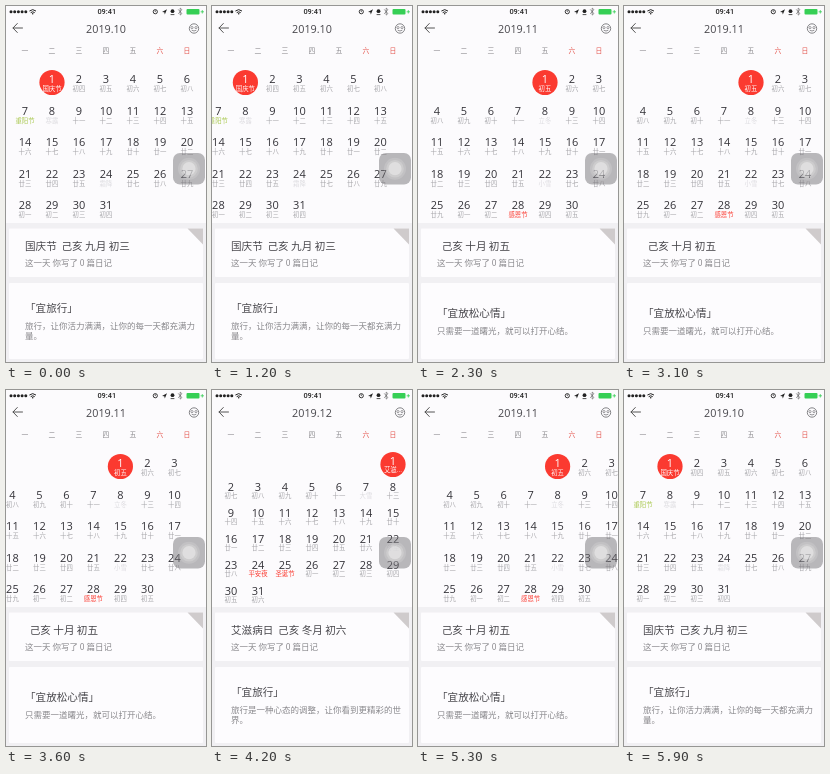
These frames come from a looping animation (200 by 356 pixels, 6000 ms). An HTML page:

```html
<!DOCTYPE html>
<html lang="zh-CN">
<head>
<meta charset="utf-8">
<title>日历</title>
<style>
html, body { margin: 0; width: 100%; height: 100%; overflow: hidden; background: #fcfbfd; }
svg { display: block; width: 100vw; height: 100vh; }
text { font-family: "Noto Sans CJK SC", "Noto Sans CJK", sans-serif; font-weight: 300; white-space: pre; }
.num { font-family: "Open Sans", "Noto Sans", sans-serif; font-weight: 400; }
.bar { font-family: Roboto, Inter, sans-serif; font-weight: 500; }
</style>
</head>
<body>
<script>
const LOOP = 6000, PAGE = 200, RED = '#fb3a30';
const INK = '#333238', SOFT = '#a5a4a8', FAINT = '#dddce0';

function el(parent, tag, attrs, text) {
  const node = document.createElementNS('http://www.w3.org/2000/svg', tag);
  for (const k in attrs) node.setAttribute(k, attrs[k]);
  if (text !== undefined) node.textContent = text;
  parent.append(node);
  return node;
}

// Text placed by its vertical centre
const baseline = (cy, size) => cy + size * 0.365;
function label(parent, str, x, cy, size, fill, anchor = 'middle', cls = '') {
  return el(parent, 'text', {
    x, y: baseline(cy, size), 'font-size': size, fill, 'text-anchor': anchor, class: cls
  }, str);
}

const svg = el(document.body, 'svg', { viewBox: '0 0 200 356', preserveAspectRatio: 'none' });
const rect = (p, x, y, width, height, fill, rx = 0) => el(p, 'rect', { x, y, width, height, fill, rx });
const line = (p, d, stroke, width = 1) =>
  el(p, 'path', { d, stroke, 'stroke-width': width, fill: 'none', 'stroke-linecap': 'round', 'stroke-linejoin': 'round' });
const dot = (p, cx, cy, r, fill, extra = {}) => el(p, 'circle', { cx, cy, r, fill, ...extra });

// first: weekday column of day 1; lunar: lunar day of day 1; fresh: day a lunar month begins
const months = [
  {
    title: '2019.10', days: 31, first: 1, lunar: 3, fresh: 28, top: 73, pitch: 31.5,
    marks: { 1: ['国庆节', RED], 7: ['重阳节', '#a9c84e'], 8: ['寒露', FAINT], 24: ['霜降', FAINT] },
    date: '国庆节  己亥 九月 初三', advice: '「宜旅行」',
    lines: ['旅行，让你活力满满，让你的每一天都充满力', '量。']
  },
  {
    title: '2019.11', days: 30, first: 4, lunar: 5, fresh: 26, top: 73, pitch: 31.5,
    marks: { 8: ['立冬', FAINT], 22: ['小雪', FAINT], 28: ['感恩节', RED] },
    date: '  己亥 十月 初五', advice: '「宜放松心情」',
    lines: ['只需要一道曙光，就可以打开心结。']
  },
  {
    title: '2019.12', days: 31, first: 6, lunar: 6, fresh: 26, top: 71, pitch: 26,
    marks: { 1: ['艾滋...', RED], 7: ['大雪', FAINT], 22: ['冬至', FAINT], 24: ['平安夜', RED], 25: ['圣诞节', RED] },
    date: '艾滋病日  己亥 冬月 初六', advice: '「宜旅行」',
    lines: ['旅行是一种心态的调整，让你看到更精彩的世', '界。']
  }
];

function lunarName(n) {
  const digit = '一二三四五六七八九十';
  return (n <= 10 ? '初' : n < 20 ? '十' : '廿') + digit[(n - 1) % 10];
}

// Sliding month pages
const strip = el(svg, 'g', {});
months.forEach((m, page) => {
  const g = el(strip, 'g', { transform: `translate(${page * PAGE} 0)` });
  const gap = m.pitch > 30 ? 10 : 9;
  for (let d = 1; d <= m.days; d++) {
    const cell = m.first + d - 1;
    const x = 19 + cell % 7 * 27;
    const y = m.top + Math.floor(cell / 7) * m.pitch;
    const n = d < m.fresh ? d + m.lunar - 1 : d - m.fresh + 1;
    const [name, color] = m.marks[d] || [lunarName(n), SOFT];
    const disc = d === 1 && dot(g, x, y + 3.5, 12.6, RED);
    const num = label(g, d, x, y, 11, INK, 'middle', 'num');
    const sub = label(g, name, x, y + gap, 6.4, color);
    if (disc) m.select = on => {
      disc.setAttribute('visibility', on ? 'visible' : 'hidden');
      num.setAttribute('fill', on ? '#fff' : INK);
      sub.setAttribute('fill', on ? '#fff' : color);
    };
  }
});

// Status bar
for (let i = 0; i < 5; i++) dot(svg, 5 + i * 3.7, 5.7, 1.5, '#222');
line(svg, 'M23.7 4.8Q26.7 2.2 29.7 4.8M25 6.4Q26.7 5 28.4 6.4', '#222', 1);
dot(svg, 26.7, 7.8, 0.8, '#222');
label(svg, '09:41', 100.8, 5.7, 7.4, '#222', 'middle', 'bar');
dot(svg, 149.3, 5.7, 2.1, 'none', { stroke: '#222', 'stroke-width': 0.9 });
line(svg, 'M149.3 5.7v-1', '#222', 0.7);
el(svg, 'path', { d: 'M156 6L161 3.2L158.8 8.4L158.3 6.3Z', fill: '#222' });
dot(svg, 166.5, 5.2, 1.9, '#222');
line(svg, 'M165 8.6h3', '#222', 0.8);
line(svg, 'M172.5 3.7l3.4 3.9l-1.7 1.5v-7l1.7 1.5l-3.4 4', '#555', 0.6);
rect(svg, 180.5, 3.1, 13, 5.4, '#36cf55', 1);
line(svg, 'M195 5.8h2.6M196.3 4.5v2.6', '#36cf55', 0.8);

// Header
line(svg, 'M16.5 22H7M11.3 17.5L7 22L11.3 26.5', '#555', 1);
const title = label(svg, '', 100, 23, 10.8, '#48474c', 'middle', 'num');
dot(svg, 188, 22.5, 4.7, 'none', { stroke: '#77767a', 'stroke-width': 0.9 });
for (const x of [186, 190]) dot(svg, x, 21.6, 1.1, 'none', { stroke: '#77767a', 'stroke-width': 0.7 });
line(svg, 'M186 24.4Q188 25.8 190 24.4', '#77767a', 0.8);
[...'一二三四五六日'].forEach((c, i) =>
  label(svg, c, 19 + i * 27, 45, 6.8, i > 4 ? '#e4564f' : '#88878b'));

// Cards
rect(svg, 0, 217, 200, 139, '#f1f0f3');
rect(svg, 3, 222.5, 194, 48.5, '#fdfcfe', 1);
rect(svg, 3, 277, 194, 76, '#fdfcfe', 1);
el(svg, 'path', { d: 'M181.5 222.5H197V238.5Z', fill: '#cfcbcc' });
const HEAD = 10.6, COPY = 8.5;
const cardText = (str, cy, size, fill) => label(svg, str, 19, cy, size, fill, 'start');
const dateText = cardText('', 240, HEAD, '#48474c');
cardText('这一天 你写了 0 篇日记', 257, COPY, '#89888c');
const advice = cardText('', 302, HEAD, '#48474c');
const body = [0, 1].map(() => cardText('', 320, COPY, '#89888c'));

// Floating button
rect(svg, 167, 147, 32, 31.5, 'rgba(110,108,113,.48)', 7);
[[11, 0.14], [8.8, 0.18], [6.6, 0.36]].forEach(([r, a]) => dot(svg, 183, 162.7, r, `rgba(255,255,255,${a})`));

let shown = -1;
function show(i) {
  if (i === shown) return;
  shown = i;
  const m = months[i], drop = m.lines.length === 1 ? 4.8 : 0;
  months.forEach((o, k) => o.select(k === i));
  title.textContent = m.title;
  dateText.textContent = m.date;
  advice.textContent = m.advice;
  advice.setAttribute('y', baseline(302 + drop, HEAD));
  body.forEach((t, k) => {
    t.textContent = m.lines[k] || '';
    t.setAttribute('y', baseline(320 + drop + k * 9.5, COPY));
  });
}

// Swipes: start time, from page, to page; details refresh after landing
const swipes = [[1100, 0, 1], [3500, 1, 2], [4400, 2, 1], [5200, 1, 0]];
const curve = [0, 0.06, 0.36, 0.72, 0.94, 1];
const STEP = 100, LAND = 500, REFRESH = 600;

function progress(ms) {
  const p = Math.min(Math.max(ms / STEP, 0), 5), i = Math.min(Math.floor(p), 4);
  return curve[i] + (curve[i + 1] - curve[i]) * (p - i);
}

function draw(t) {
  let pos = 0, current = 0;
  for (const [start, from, to] of swipes) {
    if (t < start) break;
    pos = t >= start + LAND ? to : from + (to - from) * progress(t - start);
    if (t >= start + REFRESH) current = to;
  }
  strip.setAttribute('transform', `translate(${-pos * PAGE} 0)`);
  show(current);
}

const begin = performance.now();
function tick() {
  draw((performance.now() - begin) % LOOP);
  requestAnimationFrame(tick);
}
tick();
</script>
</body>
</html>
```
